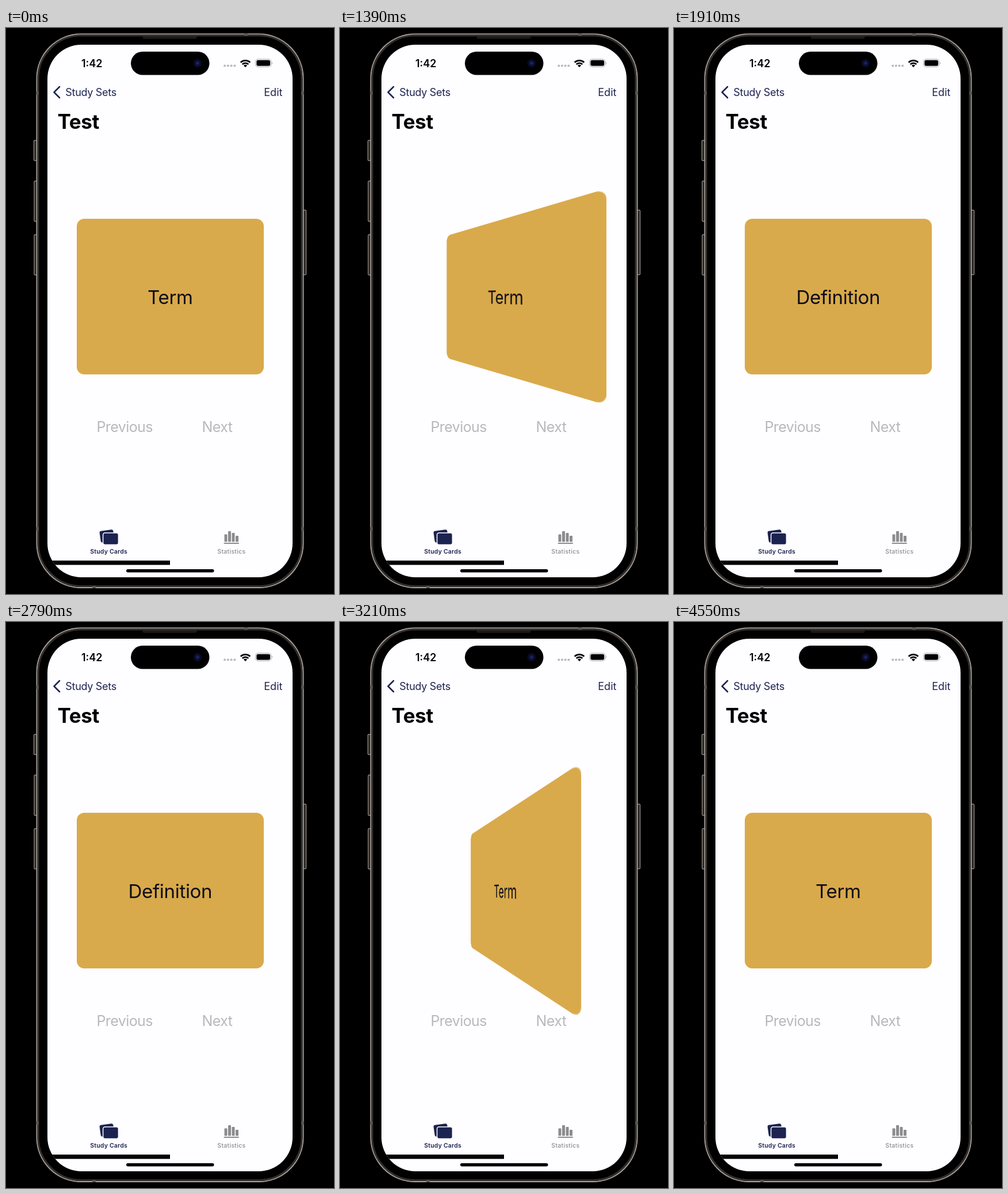
These frames come from a looping animation (570 by 982 pixels, 4580 ms). An HTML page:

```html
<!DOCTYPE html>
<html lang="en">
<head>
<meta charset="utf-8">
<title>Flash card</title>
<style>
  html, body { margin: 0; width: 100%; height: 100%; overflow: hidden; background: #000; }
  svg { position: absolute; left: 0; top: 0; }
  text, .card { font-family: Inter, Roboto, sans-serif; font-optical-sizing: none; }
  .nav { font-size: 18px; fill: #1c2350; }
  .step { font-size: 25px; letter-spacing: -.6px; fill: #b9b8bd; }
  .tab { font-size: 10.5px; text-anchor: middle; }
  .card {
    position: absolute; left: 122.8px; top: 330.8px; width: 325.2px; height: 270.7px;
    box-sizing: border-box; padding-top: 2px; border-radius: 13px;
    display: flex; align-items: center; justify-content: center;
    background: #d9aa4b; color: #0c0e18; font-size: 33px; letter-spacing: -.3px;
  }
</style>
</head>
<body>
<svg width="570" height="982" viewBox="0 0 570 982">
  <defs>
    <clipPath id="screen"><rect x="72" y="29" width="426" height="924" rx="59"/></clipPath>
  </defs>

  <!-- Phone body -->
  <g fill="#24211f" stroke="#8d8781" stroke-width="1.4">
    <rect x="48.5" y="195" width="5" height="35" rx="1.5"/>
    <rect x="49" y="265.500" width="5" height="70" rx="1.5"/>
    <rect x="49" y="358.500" width="5" height="70" rx="1.5"/>
    <rect x="516.500" y="316" width="5" height="112" rx="1.5"/>
  </g>
  <rect x="53.500" y="10.500" width="463" height="960.500" rx="77" fill="#000" stroke="#aaa39d" stroke-width="2"/>
  <rect x="56" y="13" width="458" height="955.500" rx="74.500" fill="none" stroke="#34302e" stroke-width="3"/>
  <g fill="#5a5550">
    <rect x="52.500" y="110" width="4" height="6"/>
    <rect x="513.500" y="110" width="4" height="6"/>
    <rect x="52.500" y="866" width="4" height="6"/>
    <rect x="513.500" y="866" width="4" height="6"/>
    <rect x="414" y="9.500" width="6" height="4"/>
    <rect x="150" y="968" width="6" height="4"/>
  </g>
  <rect x="238" y="14.500" width="93" height="3.500" rx="1.700" fill="#191716" stroke="#302c2a" stroke-width=".8"/>

  <g clip-path="url(#screen)">
    <path fill="#fefdff" d="M72 29h426v924H72z"/>
    <path d="M72 924h213v7.500H72z"/>
  </g>
  <rect x="209" y="939" width="152.500" height="5.500" rx="2.750"/>

  <!-- Status bar -->
  <rect x="217" y="41" width="136.500" height="40.500" rx="20.250"/>
  <circle cx="333" cy="61" r="7.500" fill="#080a20"/>
  <circle cx="333" cy="61" r="4.200" fill="#11164a"/>
  <circle cx="333" cy="61" r="1.600" fill="#252d82"/>
  <text x="131" y="67.500" font-size="18" font-weight="600">1:42</text>
  <path d="M380.200 65.500h17.400" stroke="#bbb9bf" stroke-width="4.200" stroke-linecap="round" stroke-dasharray="0 5.700"/>
  <g fill="none" stroke="#000" stroke-width="2.700">
    <path d="M407.700 59.700a12 12 0 0 1 16.600 0"/>
    <path d="M410.700 63a7.600 7.600 0 0 1 10.600 0"/>
  </g>
  <path d="M412.900 65a4.400 4.400 0 0 1 6.200 0L416 68.200z"/>
  <rect x="433.500" y="54" width="27.500" height="13.500" rx="4.300" fill="none" stroke="#a9a8ac"/>
  <rect x="435.300" y="55.800" width="23.900" height="9.900" rx="2.700"/>
  <path d="M462.300 58.500q2 2.250 0 4.500z" fill="#a9a8ac"/>

  <!-- Navigation -->
  <path d="M93 102l-9.500 9.500 9.500 9.500" fill="none" stroke="#1c2350" stroke-width="2.600" stroke-linecap="round" stroke-linejoin="round"/>
  <text class="nav" x="103.300" y="118" letter-spacing="-.3">Study Sets</text>
  <text class="nav" x="448.300" y="118">Edit</text>
  <text x="89.500" y="175" font-size="35" font-weight="700" letter-spacing="-.4">Test</text>

  <text class="step" x="157.500" y="700.500">Previous</text>
  <text class="step" x="340.500" y="700.500">Next</text>

  <!-- Tab bar -->
  <g fill="#1c2350">
    <rect x="163.500" y="871.500" width="24" height="20" rx="3" transform="rotate(-8 175.500 881.500)"/>
    <rect x="168.600" y="875.900" width="26.800" height="20.600" rx="3.500" stroke="#fefdff" stroke-width="1.500"/>
    <text class="tab" x="178.600" y="912" font-weight="600" letter-spacing=".2">Study Cards</text>
  </g>
  <g fill="#8c8b8f">
    <rect x="379.500" y="878.500" width="5" height="13" rx="1"/>
    <rect x="386" y="873" width="5" height="18.500" rx="1"/>
    <rect x="392.500" y="876" width="5" height="15.500" rx="1"/>
    <rect x="399" y="881" width="5" height="10.500" rx="1"/>
    <rect x="378.500" y="893" width="26.500" height="2" rx="1"/>
    <text class="tab" x="391.900" y="912" font-weight="500" letter-spacing=".3">Statistics</text>
  </g>
</svg>
<div class="card" id="card">Term</div>

<script>
const LOOP = 4580;
const STEP = 100 / 3;        // screen refresh, ms
const SPEED = 0.69;          // degrees per ms
const DEPTH = 359;           // viewing distance, px
const card = document.getElementById('card');

// Degrees turned by a flip that stands at `angle` at time `at`.
function turned(time, at, angle) {
  const steps = Math.floor((time - at) / STEP + 1e-6);
  return Math.min(180, Math.max(0, angle + steps * STEP * SPEED));
}

function draw(time) {
  const angle = turned(time, 1520, 130) - turned(time, 3210, 120);
  const back = angle > 90;
  const tilt = back ? 180 - angle : -angle;
  const label = back ? 'Definition' : 'Term';
  if (card.textContent !== label) card.textContent = label;
  card.style.transform = tilt ? `perspective(${DEPTH}px) rotateY(${tilt}deg)` : 'none';
}

const start = performance.now();
function tick() {
  draw((performance.now() - start) % LOOP);
  requestAnimationFrame(tick);
}
tick();
</script>
</body>
</html>
```
